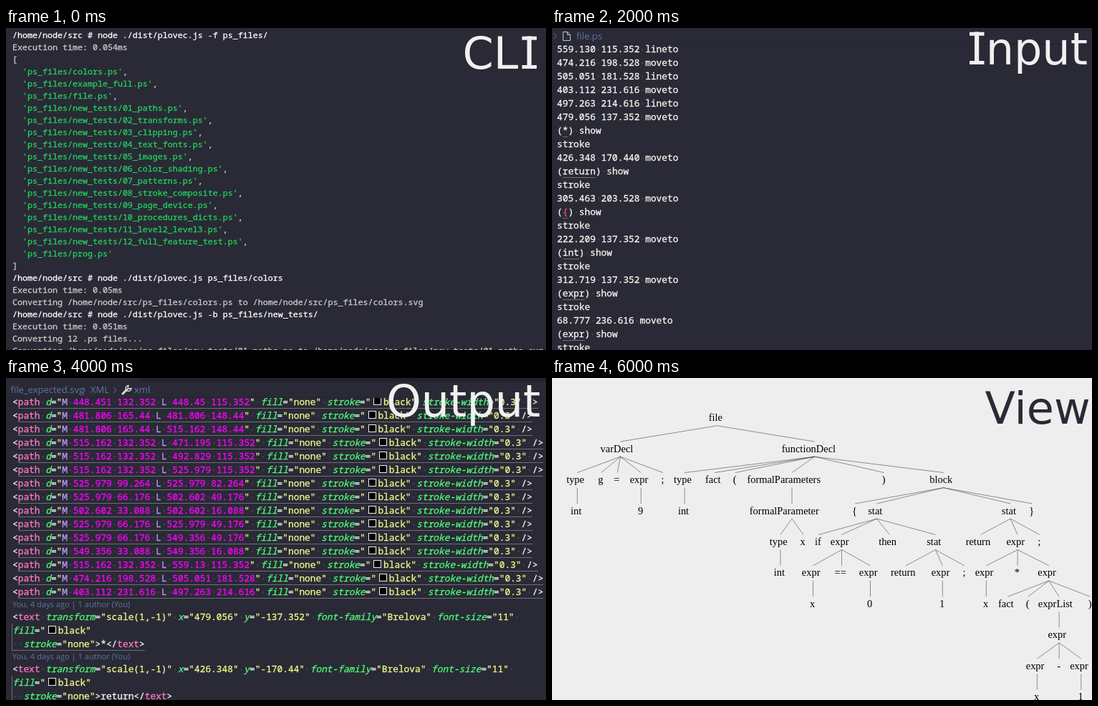
Write an HTML page that moves like this. It is 754 px wide and 451 px high and loops after 8 s.

```html
<!DOCTYPE html>
<html lang="en">
<head>
<meta charset="utf-8">
<title>Vector converter tour</title>
<style>
html, body { margin: 0; width: 100%; height: 100%; overflow: hidden; background: #292a35; }
section { position: absolute; left: 0; top: 0; width: 754px; height: 451px; overflow: hidden; background: #292a35; visibility: hidden; }
section.on { visibility: visible; }
svg { position: absolute; left: 0; top: 0; }
pre { position: absolute; margin: 0; font: 12.833px/19px "Noto Sans Mono", monospace; color: #f8f8f2; -webkit-text-stroke: .3px; }
pre div { height: 19px; }
#cli pre { left: 9px; top: 1px; font-size: 11.667px; line-height: 17px; color: #ccc; }
#cli div { height: 17px; }
#input pre { left: 7px; top: 20px; }
#output pre { left: 9px; top: 24px; }
pre .lens { height: 16px; font: 11.1px/16px "Open Sans", sans-serif; color: #6272a4; -webkit-text-stroke: 0; }
.title { font: 62px "DejaVu Sans", sans-serif; fill: #f0f0f0; }
.serif { stroke: #f0f0f0; stroke-width: 5; }
.crumb { font: 13px "Open Sans", sans-serif; fill: #6272a4; }
.icon { fill: none; stroke: #6272a4; }
b { font-weight: 400; color: #fff; }
i { font-style: normal; }
s { text-decoration: none; color: #4b4d5d; }
u { display: inline-block; height: 19px; vertical-align: top; text-decoration: none; box-shadow: inset 0 -1px #6c6d78; }
.edge { box-shadow: -1px 0 #6c6d78; }
.file { color: #23d160; }
.red { color: #ff5555; }
.tag { color: #ff79c6; }
.attr { color: #50fa7b; font-style: italic; }
.str { color: #f1fa8c; }
.num { color: #ff00ff; }
.cmd { color: #bd93f9; }
.swatch { display: inline-block; width: 9px; height: 9px; margin: 0 2.8px 0 3.8px; border: 1px solid #eee; background: #000; }
#view { background: #eee; }
#view .title { fill: #282a36; }
#tree { font: 14.44px "Liberation Serif", serif; }
#tree path { fill: none; stroke: #000; stroke-width: .42; }
</style>
</head>
<body>
<section id="cli" class="on">
  <pre></pre>
  <svg width="754" height="451">
    <text class="title" x="637.5" y="57">CL<tspan x="721.6">I</tspan></text>
    <path class="serif" d="M720.5 14.3h20.5M720.5 54.5h20.5"/>
  </svg>
</section>

<section id="input">
  <pre></pre>
  <svg width="754" height="451">
    <path class="icon" d="M2 7.5l4 4-4 4"/>
    <path class="icon" style="stroke:#c5c5c8" d="M15.5 5.5h6l4 4v8h-10zM21.5 5.5v4h4"/>
    <text class="crumb" x="34" y="16">file.ps</text>
    <path d="M0 22.5H754" stroke="#23242e"/>
    <text class="title" x="584" y="51">I<tspan x="605.7">nput</tspan></text>
    <path class="serif" d="M583 8.3h20.5M583 48.5h20.5"/>
  </svg>
</section>

<section id="output">
  <pre></pre>
  <svg width="754" height="451">
    <path d="M188 0H754V5H188z" fill="#21222c"/>
    <path d="M0 27.5H754" stroke="#23242e"/>
    <g class="crumb">
      <text x="6.5" y="21">file_expected.svg</text>
      <text x="118" y="21">XML</text>
      <text x="179" y="21">xml</text>
    </g>
    <path class="icon" d="M107 13l4 4-4 4M150 13l4 4-4 4"/>
    <path d="M163 22l6-6" stroke="#ddd" stroke-width="3" stroke-linecap="round"/>
    <path d="M171 10.5a4 4 0 1 0 4 4l-3 1-2-2z" fill="none" stroke="#ddd" stroke-width="1.4"/>
    <text class="title" x="531" y="54">Output</text>
  </svg>
</section>

<section id="view">
  <svg width="754" height="451">
    <g id="tree"></g>
    <text class="title" x="604.5" y="63.5">View</text>
  </svg>
</section>

<script>
const $ = q => document.querySelector(q);
const span = (cls, text) => `<i class="${cls}">${text}</i>`;
const fill = (id, rows) => $(`#${id} pre`).innerHTML = rows.map(r => r.startsWith('<div') ? r : `<div>${r}</div>`).join('');
const dot = '<s>·</s>';
const dots = text => text.replaceAll(' ', dot);

// Terminal
const tool = args => `<b>/home/node/src # node ./dist/plovec.js ${args}</b>`;
const took = ms => `Execution time: ${ms}ms`;
const convert = name => `Converting /home/node/src/ps_files/${name}.ps to /home/node/src/ps_files/${name}.svg`;
const tests = 'paths transforms clipping text_fonts images color_shading patterns stroke_composite page_device procedures_dicts level2_level3 full_feature_test'
  .split(' ').map((name, i) => `new_tests/${String(i + 1).padStart(2, '0')}_${name}`);
const files = ['colors', 'example_full', 'file', ...tests, 'prog'];
fill('cli', [
  tool('-f ps_files/'), took(0.054), '[',
  ...files.map((f, i) => '  ' + span('file', `'ps_files/${f}.ps'`) + (i < files.length - 1 ? ',' : '')),
  ']',
  tool('ps_files/colors'), took(0.05), convert('colors'),
  tool('-b ps_files/new_tests/'), took(0.051), 'Converting 12 .ps files...', convert(tests[0])
]);

// Page description
const listing = `559.130 115.352 lineto
474.216 198.528 moveto
505.051 181.528 lineto
403.112 231.616 moveto
497.263 214.616 lineto
479.056 137.352 moveto
(*) show
stroke
426.348 170.440 moveto
(return) show
stroke
305.463 203.528 moveto
({) show
stroke
222.209 137.352 moveto
(int) show
stroke
312.719 137.352 moveto
(expr) show
stroke
68.777 236.616 moveto
(expr) show
stroke`;
fill('input', listing.split('\n').map(row => dots(row)
  .replace(/\((.+?)\)/, (_, word) => `(<u>${word === '{' ? span('red', word) : word}</u>)`)));

// Markup
const attr = (name, value) => span('attr', name) + '=' + span('str', `"${value}"`);
const black = span('swatch', '') + 'black';
const coords = d => d.split(' ').map(t => span(/[ML]/.test(t) ? 'cmd' : 'num', t)).join(dot);
const path = d => '&lt;<u>' + [span('tag', 'path'), attr('d', coords('M ' + d)), attr('fill', 'none'),
  attr('stroke', black), attr('stroke-width', '0.3'), '/&gt;'].join(dot) + '</u>';
const label = (x, y, text) => [
  '<div class="lens">You, 4 days ago | 1 author (You)</div>',
  '&lt;' + [span('tag', 'text'), attr('transform', 'scale(1,-1)'), attr('x', x), attr('y', y),
    attr('font-family', 'Brelova'), attr('font-size', 11), ''].join(dot),
  `<div class="edge">${span('attr', 'fill')}=${span('str', `"${black}"`)}</div>`,
  `<div class="edge"><u>${dot + dot + attr('stroke', 'none')}&gt;${text}&lt;/${span('tag', 'text')}&gt;</u></div>`
];
const segments = `448.451 132.352 L 448.45 115.352
481.806 165.44 L 481.806 148.44
481.806 165.44 L 515.162 148.44
515.162 132.352 L 471.195 115.352
515.162 132.352 L 492.829 115.352
515.162 132.352 L 525.979 115.352
525.979 99.264 L 525.979 82.264
525.979 66.176 L 502.602 49.176
502.602 33.088 L 502.602 16.088
525.979 66.176 L 525.979 49.176
525.979 66.176 L 549.356 49.176
549.356 33.088 L 549.356 16.088
515.162 132.352 L 559.13 115.352
474.216 198.528 L 505.051 181.528
403.112 231.616 L 497.263 214.616`;
fill('output', [...segments.split('\n').map(path),
  ...label(479.056, -137.352, '*'), ...label(426.348, -170.44, 'return')]);

// Parse tree: [text, x, ...children]
const tree = ['file', 230.5,
  ['varDecl', 95.5,
    ['type', 35.3, ['int', 35.3]], ['g', 68.7], ['=', 91.3], ['expr', 124.3, ['9', 124.3]], [';', 155]],
  ['functionDecl', 366.7,
    ['type', 185.2, ['int', 185.2]], ['fact', 227.2], ['(', 255.8],
    ['formalParameters', 335, ['formalParameter', 335, ['type', 319, ['int', 319]], ['x', 351]]],
    [')', 463.7],
    ['block', 546.8,
      ['{', 423.2],
      ['stat', 453.5,
        ['if', 372.3],
        ['expr', 404.5, ['expr', 364.5, ['x', 364.5]], ['==', 404.5], ['expr', 444.5, ['0', 444.5]]],
        ['then', 471.3],
        ['stat', 535.5, ['return', 494], ['expr', 545.3, ['1', 545.3]], [';', 576]]],
      ['stat', 640.1,
        ['return', 598.7],
        ['expr', 650.1,
          ['expr', 606.3, ['x', 606.3]], ['*', 650.1],
          ['expr', 693.9,
            ['fact', 636.2], ['(', 664.6],
            ['exprList', 708.1,
              ['expr', 708.1, ['expr', 677.4, ['x', 677.4]], ['-', 708.1], ['expr', 738.8, ['1', 738.8]]]],
            [')', 751.6]]],
        [';', 680.6]],
      ['}', 670.4]]]];
const add = (name, attrs) => {
  const el = document.createElementNS('http://www.w3.org/2000/svg', name);
  for (const key in attrs) el.setAttribute(key, attrs[key]);
  return $('#tree').appendChild(el);
};
function grow([text, x, ...kids], y) {
  const el = add('text', { y });
  el.textContent = text;
  el.setAttribute('x', x - 0.61 * el.getComputedTextLength());
  for (const kid of kids) {
    add('path', { d: `M${x} ${y + 6.6}L${kid[1]} ${y + 28.9}` });
    grow(kid, y + 43.44);
  }
}
grow(tree, 60.2);

const scenes = document.querySelectorAll('section');
function frame() {
  const now = Math.floor(performance.now() / 2000) % scenes.length;
  scenes.forEach((scene, i) => scene.classList.toggle('on', i === now));
  requestAnimationFrame(frame);
}
frame();
</script>
</body>
</html>
```
